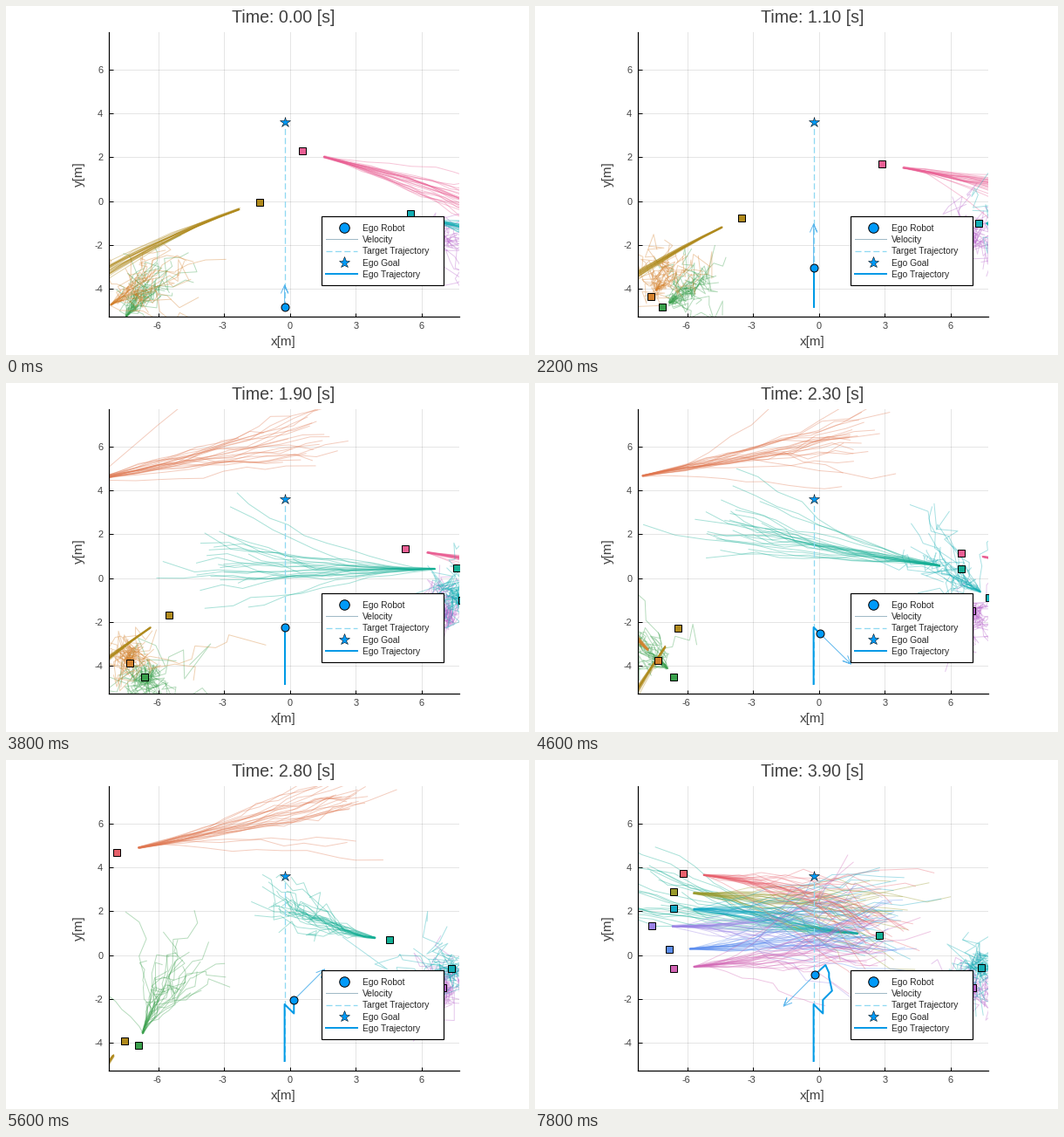
These frames come from a looping animation (600x400 px, 8 s). A matplotlib script:

```python
import numpy as np
import matplotlib.pyplot as plt
from matplotlib.animation import FuncAnimation
from matplotlib.collections import LineCollection
from matplotlib.patches import Rectangle

W, H, DPI = 600, 400, 100
PX = 72 / DPI                       # one pixel in points
UNIT, X0, Y0 = 25.17, 326.6, 223.8  # pixels per metre, pixel of (0, 0)
LEFT, RIGHT, TOP, BOTTOM = 119, 520.5, 30, 356
SHIFT = 0.7                         # all drawing sits this far to the left
FRAMES, INTERVAL = 40, 200
SAMPLES, STEPS = 25, 10
TOP_STEP = 25                       # longest step of a prediction
SETTLED = 36                        # predictions keep their noise from here on
BLUE, TRAIL, DARK = "#009af9", "#009ae6", "#404040"
DASHED = dict(color="#8fd9f2", lw=1.3 * PX, dashes=(5.4, 2.6), dash_capstyle="butt")

plt.rcParams["font.family"] = "Liberation Sans"
fig = plt.figure(figsize=(W / DPI, H / DPI), dpi=DPI, facecolor="white")

# Both axes use pixel coordinates with y pointing down.
ax = fig.add_axes([(LEFT - SHIFT) / W, 1 - BOTTOM / H,
                   (RIGHT - LEFT) / W, (BOTTOM - TOP) / H])
ax.set_xlim(LEFT, RIGHT)
ax.set_ylim(BOTTOM, TOP)
top = fig.add_axes([0, 0, 1, 1], zorder=5)
top.set_xlim(SHIFT, W + SHIFT)
top.set_ylim(H, 0)
top.axis("off")


def label(x, y, text, size, color=DARK, **kw):
    return top.text(x, y, text, fontsize=size * PX, color=color, **kw)


def marker(axes, x, y, shape, size, color, z, edge=1):
    return axes.plot([x], [y], shape, ms=size * PX, mfc=color, mec="black",
                     mew=edge * PX, zorder=z)[0]


def along(keys, frame):
    """Position on a path of (frame, x, y) key points."""
    t, x, y = np.array(keys, float).T
    return np.array([np.interp(frame, t, x), np.interp(frame, t, y)])


def pace(keys, frame):
    """Movement from this frame to the next."""
    return along(keys, frame + 1) - along(keys, frame)


def setup_axes():
    ax.spines[["top", "right"]].set_visible(False)
    for side in ("left", "bottom"):
        ax.spines[side].set_linewidth(1.2 * PX)
        ax.spines[side].set_zorder(9)
    xs, ys = range(-6, 7, 3), range(-4, 7, 2)
    ax.set_xticks([X0 + UNIT * v for v in xs], [])
    ax.set_yticks([Y0 - UNIT * v for v in ys], [])
    ax.tick_params(direction="in", length=4.5 * PX, width=PX)
    ax.grid(color="black", alpha=0.1, lw=PX)
    ax.set_axisbelow(True)
    for v in xs:
        label(X0 + UNIT * v - (1.5 if v < 0 else 0), 370, str(v), 11, ha="center")
    for v in ys:
        label(112, Y0 - UNIT * v + 4, str(v), 11, ha="right")
    label(318.7, 389, "x[m]", 15.3, ha="center")
    label(85, 193, "y[m]", 15.3, ha="center", va="center", rotation=90)


def draw_legend():
    top.add_patch(Rectangle((362.2, 240.7), 140.3, 79.5, fc="white", ec="black", lw=1.2 * PX))
    names = ["Ego Robot", "Velocity", "Target Trajectory", "Ego Goal", "Ego Trajectory"]
    rows = [254 + 13.25 * i for i in range(len(names))]
    for y, name in zip(rows, names):
        label(409.8, y + 3.8, name, 10.3, color="#262626")
    marker(top, 389, rows[0], "o", 11.5, BLUE, 3)
    marker(top, 389, rows[3], "*", 13.5, BLUE, 3, edge=0.5)
    styles = [dict(color="#9fb9c6", lw=PX), DASHED, dict(color=TRAIL, lw=2 * PX)]
    for y, style in zip((rows[1], rows[2], rows[4]), styles):
        top.plot([368, 404], [y, y], **style)


class Agent:
    """A pedestrian with a fan of predicted paths, shown from first to last key."""

    def __init__(self, color, keys, spread=1.3, mark=None, step=None, bend=0):
        self.keys, self.spread, self.step, self.bend = keys, spread, step, bend
        self.fan = LineCollection([], colors=color, alpha=0.36, linewidths=PX, zorder=3)
        ax.add_collection(self.fan, autolim=False)
        self.dot = marker(ax, 0, 0, "s", 8.5, mark or color, 6)

    def heading(self, frame):
        if self.step is not None:
            return np.array(self.step)
        step = 5 * pace(self.keys, frame)
        return step * min(1, TOP_STEP / max(np.hypot(*step), 1e-6))

    def predict(self, frame, seed):
        rng = np.random.default_rng([seed, min(frame, SETTLED)])
        step = self.heading(frame)
        speed = min(1, np.hypot(*step) / TOP_STEP)
        # Slow walkers lose their heading and wander about.
        k = np.arange(1, STEPS + 1)[None, :, None]
        shape = (SAMPLES, STEPS, 2)
        drift = np.cumsum(0.6 * self.spread * rng.standard_t(3, shape), axis=1)
        jitter = self.spread * (0.25 + 0.75 * (1 - speed)) * k * rng.normal(size=shape)
        walk = np.cumsum(step * speed + k * np.array([0, self.bend]) + drift, axis=1) + jitter
        start = along(self.keys, frame) + step + rng.normal(0, 0.5, (SAMPLES, 1, 2))
        return np.concatenate([start, start + walk], axis=1)

    def update(self, frame, seed):
        shown = self.keys[0][0] <= frame < self.keys[-1][0]
        self.fan.set_visible(shown)
        self.dot.set_visible(shown)
        if shown:
            self.fan.set_segments(list(self.predict(frame, seed)))
            x, y = along(self.keys, frame)
            self.dot.set_data([x], [y])


def arrow_points(p, v):
    """Shaft with an open head; empty when standing still."""
    size = np.hypot(*v)
    if size < 1:
        return [], []
    u = v / size
    n = np.array([-u[1], u[0]])
    tip = p + v
    back = tip - 9 * u
    return np.array([p, tip, back + 4 * n, tip, back - 4 * n]).T


setup_axes()
draw_legend()
title = label(318.7, 19, "", 19.6, ha="center")

agents = [
    Agent("#3aa04c", [(0, 132, 364), (11, 146.5, 345.5), (19, 159.5, 337),
                      (23, 159.5, 337), (28, 152.5, 327.5), (31, 155.5, 319)]),
    Agent("#d4822e", [(0, 110, 350), (11, 134, 333.5), (19, 143, 321.5),
                      (23, 142, 318.5), (26, 135, 311)]),
    Agent("#b08a1c", [(0, 292, 225), (11, 238, 243), (19, 187.5, 266.5),
                      (23, 164.5, 281.5), (28, 136.5, 322), (36, 117, 348.3)],
          spread=0.5, bend=0.9),
    Agent("#e0764f", [(14, 48, 122), (31, 145, 102)], mark="#e5606a"),
    Agent("#b866cc", [(0, 470, 252), (11, 492, 262), (23, 501.5, 261.5),
                      (40, 503, 261.5)]),
    Agent("#ea5f94", [(0, 341, 166.5), (11, 398.5, 181.5), (23, 489.5, 195),
                      (27, 526, 201)], bend=0.4),
    Agent("#12aeb4", [(0, 465, 238.5), (11, 509.5, 249.5), (19, 524, 249),
                      (23, 522, 246.5), (28, 511.5, 239.5), (40, 512.5, 238)]),
    Agent("#12ae94", [(14, 548, 214), (19, 517.5, 212), (23, 490, 213),
                      (28, 441, 206), (35, 417.5, 203), (40, 390.6, 200.5)], bend=-0.4),
]

# A group enters from the left all at once, heading for the middle.
group = [("#9a82e6", 135, 190.5), ("#989a2c", 159.5, 151.5), ("#14a8c4", 159.5, 170.5),
         ("#5b8def", 155, 217.5), ("#d264b4", 160, 239), ("#e8606c", 171, 130)]
for color, x, y in group:
    inward = (185 - y) / 30
    agents.append(Agent(color, [(SETTLED, x, y), (FRAMES, x, y)], spread=1.7,
                        step=(23, inward), bend=inward / 3))

ego = [(0, 320.3, 345), (4, 320.3, 335), (15, 320.3, 280), (21, 320.3, 280),
       (24, 331, 290.5), (28, 331, 275), (31, 341.5, 264.5), (35, 338, 249),
       (36, 338, 244), (37, 334, 235), (38, 330, 238.5), (39, 322, 246),
       (40, 318.4, 249.6)]

ax.plot([320.3, 320.3], [345, 133.5], zorder=4, **DASHED)
trail, = ax.plot([], [], color=TRAIL, lw=2 * PX, zorder=7)
arrow, = ax.plot([], [], color="#1f9be6", lw=PX, alpha=0.7, zorder=7)
marker(ax, 320.3, 133.5, "*", 12, BLUE, 8, edge=0.5)
robot = marker(ax, 0, 0, "o", 9, BLUE, 8)


def update(frame):
    title.set_text(f"Time: {frame / 10:.2f} [s]")
    for seed, agent in enumerate(agents):
        agent.update(frame, seed)
    x, y = along(ego, frame)
    robot.set_data([x], [y])
    trail.set_data(*along(ego, np.arange(frame + 1)))
    arrow.set_data(*arrow_points(along(ego, frame), 10 * pace(ego, frame)))


anim = FuncAnimation(fig, update, frames=FRAMES, interval=INTERVAL,
                     repeat=True, repeat_delay=0)
plt.show()
```
